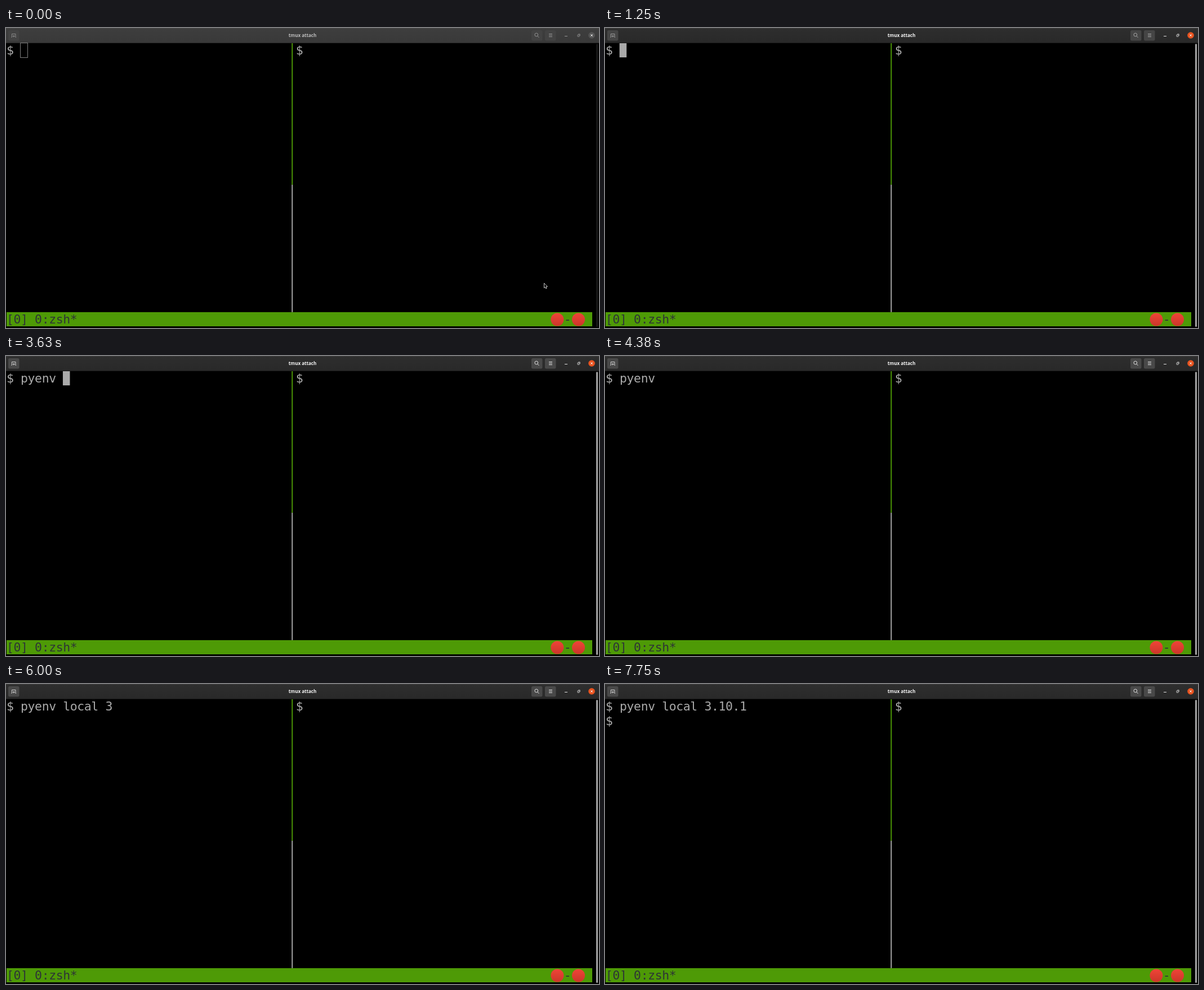
Recreate the animation shown at these times as an HTML page with a canvas. Size 1053 px wide and 532 px high, loop 8000 ms.

```html
<!DOCTYPE html>
<html lang="en">
<head>
<meta charset="utf-8">
<title>tmux attach</title>
<style>
  html, body { margin: 0; width: 100%; height: 100%; overflow: hidden; background: #000; }
  canvas { display: block; }
</style>
</head>
<body>
<canvas id="stage" width="1053" height="532"></canvas>
<script>
const ctx = document.getElementById('stage').getContext('2d');
const LOOP = 8000, STEP = 125, BLINK = 500;
const COL = 12.53, ROW = 25.1, LEFT = 1, TOP = 27;
const SIZE = 21.5, MONO = `${SIZE}px "DejaVu Sans Mono", monospace`;
const GREEN = '#4e9a06', GREY = '#aaaaaa', DARK = '#2e3436';
const FOCUS = 1000, READY = 1750, ENTER = 7125, PROMPT = 7375;

// Each burst types one character per step; a completion arrives at once.
const BURSTS = [
  { at: 2750, text: 'p' },
  { at: 3125, text: 'yenv ' },
  { at: 4500, text: 'local ' },
  { at: 5375, text: '3' },
  { at: 6375, text: '.' },
  { at: 6750, text: '10.1 ', whole: true }
];

const colX = col => LEFT + col * COL;
const rowY = row => TOP + row * ROW;
const fade = (t, from, span) => Math.max(0, Math.min(1, (t - from) / span));
const grey = (a, b, k) => {
  const v = Math.round(a + (b - a) * k);
  return `rgb(${v},${v},${v})`;
};

function rect(x, y, w, h, fill) {
  ctx.fillStyle = fill;
  ctx.fillRect(x, y, w, h);
}

function rounded(x, y, w, h, r, fill) {
  ctx.fillStyle = fill;
  ctx.beginPath();
  ctx.roundRect(x, y, w, h, r);
  ctx.fill();
}

function disc(x, y, r, fill) {
  ctx.fillStyle = fill;
  ctx.beginPath();
  ctx.arc(x, y, r, 0, Math.PI * 2);
  ctx.fill();
}

function stroke(path, color, width = 1) {
  ctx.strokeStyle = color;
  ctx.lineWidth = width;
  ctx.stroke(new Path2D(path));
}

function shade(y0, y1, from, to) {
  const g = ctx.createLinearGradient(0, y0, 0, y1);
  g.addColorStop(0, from);
  g.addColorStop(1, to);
  return g;
}

// Glyphs keep to the whole-cell advance of the terminal grid.
function print(text, col, row, color = GREY) {
  ctx.font = MONO;
  ctx.textAlign = 'left';
  ctx.letterSpacing = `${COL - SIZE * 0.602}px`;
  ctx.fillStyle = color;
  ctx.fillText(text, colX(col), rowY(row) + 20.4);
  ctx.letterSpacing = '0px';
}

function cursor(col, row, filled) {
  const x = colX(col), y = rowY(row);
  if (filled) return rect(x - 0.3, y, COL, ROW, GREY);
  ctx.strokeStyle = '#8c8c8c';
  ctx.lineWidth = 0.9;
  ctx.strokeRect(x - 0.5, y - 0.4, COL + 0.4, ROW + 0.8);
}

function titleBar(t) {
  const bar = fade(t, 875, 250), icons = fade(t, 1125, 500);
  rect(0, 0, 1053, 26, shade(0, 26, grey(62, 46, bar), grey(57, 41, bar)));
  rect(0, 0, 1053, 1, grey(70, 58, bar));
  rect(0, 26, 1053, 1, grey(38, 24, bar));
  for (const x of [4, 933, 957]) rounded(x, 4, 19.5, 18.5, 2.5, grey(67, 73, icons));

  const ink = grey(145, 222, icons), win = grey(150, 225, bar);
  stroke('M9.5 16.5h1v-6h6.5v6h1M13.8 12.5v4m-2-2h4', ink, 0.9);
  stroke('M938.9 12a2.9 2.9 0 1 0 5.8 0a2.9 2.9 0 1 0-5.8 0M943.8 14.2l2.7 2.8', ink);
  for (let i = 0; i < 3; i++) stroke(`M964 ${10.5 + i * 2.5}h6`, ink);
  stroke('M992 14.5h5', win);
  stroke('M1015 12h3v3.2h-3zM1016.3 10.8h2.9v3.2', win, 0.8);
  disc(1040, 13, 5.8, bar < 0.5 ? '#555555' : '#e95420');
  stroke('M1038.2 11.2l3.6 3.6m0-3.6l-3.6 3.6', '#f2f2f2');

  ctx.font = 'bold 8px "Open Sans", "Noto Sans", sans-serif';
  ctx.textAlign = 'center';
  ctx.fillStyle = grey(188, 245, bar);
  ctx.fillText('tmux attach', 526.5, 15.9);
}

function statusBar() {
  rect(LEFT, rowY(19), 83 * COL, ROW, GREEN);
  print('[0] 0:zsh*', 0, 19, DARK);
  print('-', 79, 19, DARK);
  const red = shade(505, 529, '#f04538', '#ca3629');
  for (const col of [78, 81]) disc(colX(col) + 0.6, 517, 11.5, red);
}

// The pointer glides out through the lower edge.
function pointer(t) {
  const k = fade(t, 0, 625);
  ctx.save();
  ctx.translate(955, 452 + 82 * k * k * (3 - 2 * k));
  const arrow = new Path2D('M.5.5v8.5l2-1.6 1.2 2.8 1.4-.7-1.1-2.7 2.5-.2z');
  ctx.fillStyle = '#000';
  ctx.strokeStyle = '#d8d8d8';
  ctx.lineWidth = 0.9;
  ctx.fill(arrow);
  ctx.stroke(arrow);
  ctx.restore();
}

function typed(t) {
  let text = '', last = READY;
  for (const { at, text: part, whole } of BURSTS) {
    if (t < at) break;
    const n = whole ? part.length : Math.min(part.length, Math.floor((t - at) / STEP) + 1);
    text += part.slice(0, n);
    last = whole ? at : at + (n - 1) * STEP;
  }
  return { text, last: t < ENTER ? last : ENTER };
}

function panes(t) {
  rect(507.3, TOP, 1.9, 10 * ROW, GREEN);
  rect(507.3, rowY(10), 1.9, 9 * ROW, GREY);
  print('$', 41, 0);

  const { text, last } = typed(t);
  const entered = t >= ENTER, prompt = t >= PROMPT;
  print('$ ' + text, 0, 0);
  if (prompt) print('$', 0, 1);

  const idle = Math.max(0, t - last);
  if (Math.floor(idle / BLINK) % 2) return;
  const col = entered ? (prompt ? 2 : 0) : 2 + text.length;
  cursor(col, entered ? 1 : 0, t >= FOCUS);
}

function draw(time) {
  const t = Math.floor(time / STEP + 0.04) * STEP;
  rect(0, 0, 1053, 532, '#000');
  titleBar(t);
  panes(t);
  statusBar();
  rounded(1048, 28, 3, 502, 1.5, grey(24, 165, fade(t, 875, 250)));
  pointer(t);
}

const start = performance.now();
function frame() {
  draw((performance.now() - start) % LOOP);
  requestAnimationFrame(frame);
}
frame();
</script>
</body>
</html>
```
